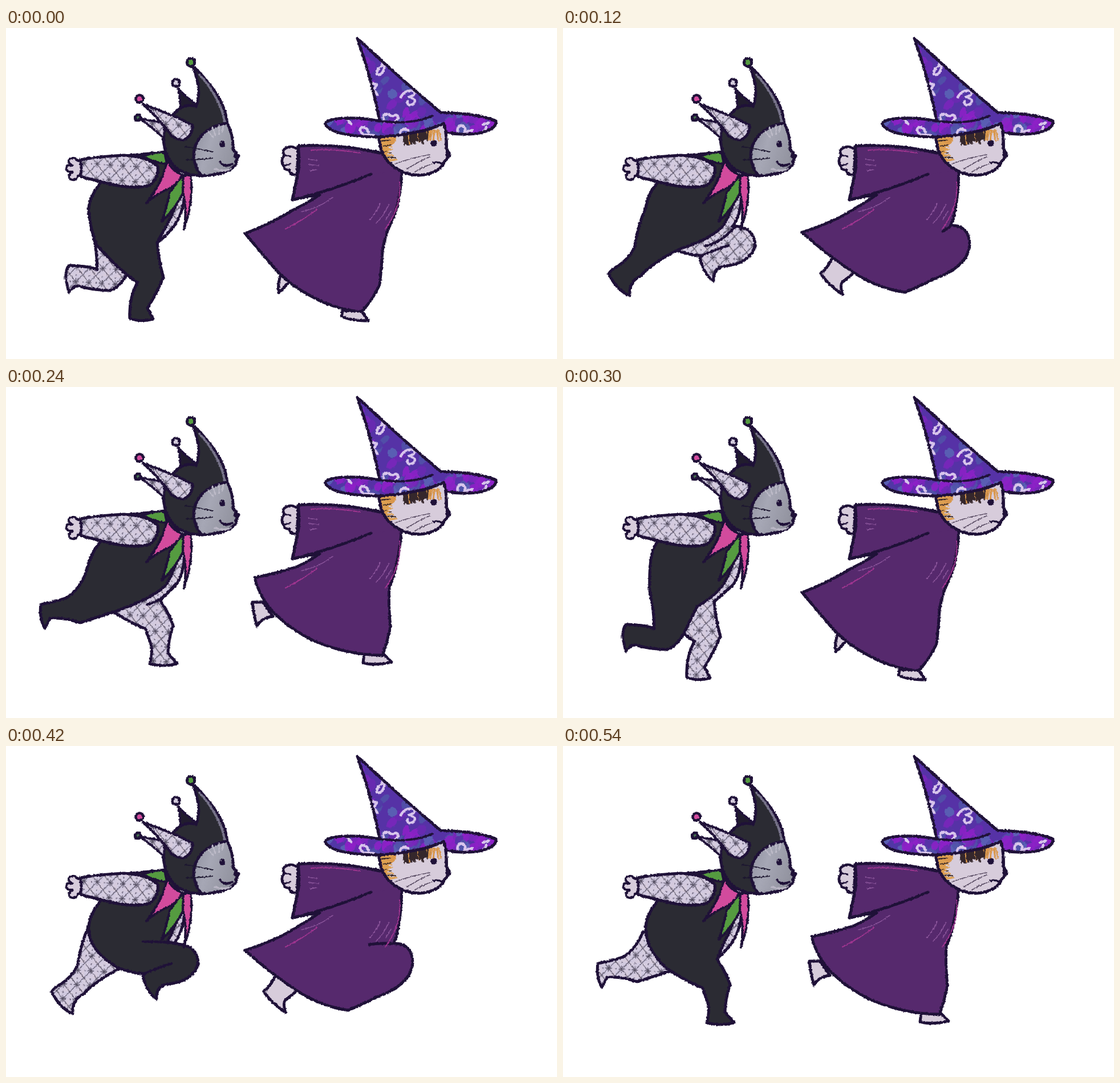
These frames come from a looping animation (966 px wide and 580 px high, 600 ms). An HTML page:

```html
<!DOCTYPE html>
<html lang="en">
<head>
<meta charset="utf-8">
<title>Two running cats in costume</title>
<style>
html, body { margin: 0; width: 100%; height: 100%; overflow: hidden; background: #fff; }
svg { display: block; width: 966px; height: 580px; }
</style>
</head>
<body>
<svg id="stage" viewBox="0 0 966 580" width="966" height="580"></svg>
<script>
const INK = '#1f1138', COAL = '#2b2b33', LACE = 'url(#lace)', GOWN = '#56296d', FUR = '#d7ccdb';
const PINK = '#d24b9d', GREEN = '#559b40';
const STEP = 60, COUNT = 10;

// Small repeatable random generator
let seed = 11;
const rnd = (a, b) => {
  seed = (seed * 16807) % 2147483647;
  return a + (b - a) * seed / 2147483647;
};

const shape = (d, fill, w = 5, extra = '') =>
  `<path d="${d}" fill="${fill}" stroke="${INK}" stroke-width="${w}" ${extra}/>`;
const line = (d, color = INK, w = 4, extra = '') =>
  `<path d="${d}" fill="none" stroke="${color}" stroke-width="${w}" ${extra}/>`;
const dot = (x, y, rx, fill, ry = rx) =>
  `<ellipse cx="${x}" cy="${y}" rx="${rx}" ry="${ry}" fill="${fill}"/>`;
const bell = (x, y, r, fill) =>
  `<circle cx="${x}" cy="${y}" r="${r}" fill="${fill}" stroke="${INK}" stroke-width="4.5"/>`;

// Jester legs: f = leg in front, b = leg behind (starting at s)
// Wizard: gown hem (hem) and feet
const poses = [
  { f: 'L265 376Q268 410 276 437Q264 465 248 491L258 510Q238 516 217 509Q215 475 230 446Q195 421 159 380',
    s: '235 385',
    b: 'Q222 410 212 432Q198 455 183 460Q150 459 127 452Q118 452 110 463L105 440Q104 425 110 416Q138 416 160 423Q160 395 152 357',
    hem: 'Q692 300 680 330Q665 360 660 390Q658 425 655 450Q641 480 623 497Q590 495 555 480Q500 455 470 420Q440 385 419 360Q470 340 505 318',
    feet: 'M483 430Q476 445 478 464L500 442ZM590 496L588 505Q604 513 635 513L622 494Z' },
  { f: 'L285 352Q308 385 298 412Q275 438 235 436Q222 445 221 468Q203 455 200 428L205 396L180 385',
    s: '222 396',
    b: 'Q190 420 173 455Q163 475 168 499Q146 500 128 484Q142 460 147 435Q149 395 144 345',
    hem: 'Q692 300 680 335Q672 355 678 370Q694 395 678 425Q650 465 605 487Q560 480 520 455Q465 410 418 358Q470 338 505 318',
    feet: 'M515 448Q511 470 500 482Q515 498 540 499Q536 483 545 468Z' },
  { f: 'L302 347Q335 350 337 380Q330 412 285 417Q262 420 264 444Q246 430 240 403L243 399Q215 397 195 388',
    s: '208 386',
    b: 'Q165 405 135 435Q115 445 117 469Q95 460 80 431Q84 424 95 418Q115 405 125 385Q130 350 145 315',
    inkB: 'M302 347Q280 375 250 382M290 381Q268 388 243 399',
    inkF: 'M240 343Q270 342 302 347M290 381Q268 388 243 399',
    hem: 'Q692 320 680 346Q712 345 713 380Q710 418 650 440Q620 455 600 463Q560 458 520 435Q465 400 419 358Q480 338 512 316',
    feet: 'M472 402Q465 420 452 430Q460 445 490 467Q485 450 490 445L514 426Z',
    foldB: 'M681 346L666 356', foldF: 'M637 348Q660 344 685 347' },
  { f: 'L270 374Q290 400 333 435Q350 433 364 429Q355 455 338 468Q300 450 250 427L176 389',
    s: '172 387',
    b: 'Q130 385 97 383Q85 365 68 345L41 343Q55 325 78 314Q95 330 106 341Q122 335 140 328',
    inkB: 'M297 345Q287 362 262 378',
    hem: 'Q687 325 678 350Q680 395 709 437Q660 457 590 451Q520 442 480 410Q440 375 436 340Q438 325 452 313Q490 325 520 312',
    feet: 'M455 312L445 309Q425 325 409 345Q425 340 438 342ZM680 445L713 461Q725 445 735 425L708 434Z' },
  { f: 'L270 374Q285 395 293 418Q284 445 284 466L300 485Q275 491 252 485Q257 470 255 455L245 424Q205 407 180 388',
    s: '190 394',
    b: 'L130 413Q95 402 77 406L68 423Q58 405 61 381Q85 377 107 369Q130 353 140 325',
    inkB: 'M297 345Q277 373 248 381',
    hem: 'Q687 320 672 350Q670 380 674 420Q668 450 660 470Q600 470 540 445Q490 420 460 385Q442 360 436 334Q480 325 510 315',
    feet: 'M450 377L432 377Q434 400 440 419Q447 405 468 402ZM628 468L626 483Q645 489 676 482L660 466Z' }
];

const TORSO = 'M200 225L280 217L308 262Q302 310 283 343';
const STRIP = 'M305 262L313 290';

function bodyPaths(p, nearInFront) {
  return nearInFront
    ? { near: TORSO + p.f + 'Q150 360 146 330Q140 305 165 272Z',
        far: `${STRIP}Q312 340 268 374L255 340ZM${p.s}${p.b}L200 335Z` }
    : { near: `${TORSO}Q268 366 ${p.s}${p.b}Q150 288 165 272Z`,
        far: `${STRIP}Q312 330 297 348${p.f}L262 340Z` };
}

const CONE = 'M655 163Q642 92 616 18Q688 86 762 148';
const BRIM = 'M655 163C610 155 560 156 560 169Q572 190 655 191Q730 185 768 167L772 183Q800 189 830 184Q860 178 859 163Q830 150 762 148';
const FACE = 'M654 190Q656 222 672 236Q692 256 722 258Q752 257 765 241Q769 233 778 223L772 212Q773 195 769 165Z';

function defs() {
  return `<defs>
  <filter id="rough" filterUnits="userSpaceOnUse" x="0" y="0" width="966" height="580" color-interpolation-filters="sRGB">
    <feTurbulence type="fractalNoise" baseFrequency=".32" numOctaves="1" seed="4"/>
    <feColorMatrix values="1 0 0 0 0  0 1 0 0 0  0 0 1 0 0  0 0 0 0 1" result="noise"/>
    <feDisplacementMap in="SourceGraphic" in2="noise" scale="4" xChannelSelector="R" yChannelSelector="G"/>
  </filter>
  <linearGradient id="mask" x1="0" y1="0" x2="1" y2=".4">
    <stop offset="0" stop-color="#8f909f"/><stop offset=".45" stop-color="#a6a7b5"/><stop offset="1" stop-color="#92939f"/>
  </linearGradient>
  <linearGradient id="tint" x1="0" y1="0" x2="1" y2="1">
    <stop offset="0" stop-color="#d9d0df"/><stop offset=".5" stop-color="#cfc8e0"/><stop offset="1" stop-color="#dacddb"/>
  </linearGradient>
  <pattern id="lace" width="23" height="26" patternUnits="userSpaceOnUse" patternTransform="translate(3 6) rotate(4)">
    <rect width="23" height="26" fill="url(#tint)"/>
    <path d="M0 0L23 26M23 0L0 26M6 13H17M11.500 7V19" stroke="#565063" stroke-width="1.300" fill="none"/>
    <circle cx="11.500" cy="1.500" r="1.200" fill="#625a72"/><circle cx="1.500" cy="13" r="1.200" fill="#625a72"/>
  </pattern>
  <clipPath id="hatClip"><path d="${CONE}L740 170Z"/><path d="${BRIM}Q705 175 655 163Z"/></clipPath>
  <clipPath id="faceClip"><path d="${FACE}"/></clipPath>
  </defs>`;
}

function jesterTop() {
  const collar =
    shape('M238 226Q258 217 278 218L282 238L268 236Z', GREEN, 4) +
    shape('M309 259Q314 275 311 288Q296 318 273 339Q283 310 287 288Z', GREEN, 4) +
    shape('M311 258L324 258Q328 290 319 330L312 352Q318 320 310 286Z', PINK, 4) +
    shape('M283 233Q292 252 309 257Q300 276 280 284Q262 292 246 307Q266 280 274 260Z', PINK, 4);
  const arm =
    shape('M132 231L126 233Q118 224 111 230Q107 237 117 241Q106 238 105 246Q106 253 117 252Q107 257 113 265Q123 269 126 259L132 258Z', FUR, 4) +
    shape('M130 231Q165 225 207 223Q250 226 266 242Q269 261 252 276Q225 282 190 275Q158 268 130 260Q134 245 130 231Z', LACE);
  const hood =
    shape('M302 106Q316 122 336 136L305 148Q307 126 302 106Z', '#211c2e', 4) +
    shape('M276 195Q278 160 305 141Q319 132 333 138Q345 110 327 66Q352 89 372 120Q386 144 388 167L345 259Q312 258 296 243Q278 225 276 195Z', COAL) +
    line('M339 82Q360 104 372 130Q381 148 383 164', '#77738a', 4);
  const horns =
    shape('M235 159L278 166L277 193Q258 176 235 159Z', LACE, 4) +
    shape('M240 133L301 157L327 170Q328 188 312 196Q300 197 290 188Q272 163 240 133Z', LACE, 4.5);
  const face =
    shape('M388 167Q399 188 398 213L408 224Q403 231 403 239Q390 257 343 259C308 215 345 170 388 167Z', 'url(#mask)') +
    line('M362 174L367 188M373 171L374 186M354 181L363 191M381 171L379 182', '#bdbbc8', 2.5) +
    line('M366 247Q382 252 394 247', '#b9b5c4', 3) +
    line('M375 234Q382 246 397 238') +
    dot(379, 203, 5, INK, 6) + dot(404, 224, 5, INK, 5) + dot(377, 201, 1.2, '#8d8998');
  const whiskers = line('M314 208Q340 212 362 217M316 231Q340 231 362 228', '#1d1730', 2);
  return collar + arm + hood + horns + face + whiskers +
    bell(324, 60, 7, GREEN) + bell(298, 96, 6.5, '#d2cadb') + bell(234, 124, 6.5, PINK) + bell(231, 157, 5, '#477451');
}

function hatFill() {
  const tones = ['#7c26bc', '#5054a8', '#8f20c8', '#5138a6', '#6a2ab2', '#5a67b5'];
  let s = '<rect x="550" y="10" width="320" height="190" fill="#5632a6"/>';
  for (let i = 0; i < 170; i++) {
    const x = rnd(560, 860), y = i % 2 ? rnd(150, 192) : rnd(20, 165);
    const tone = tones[Math.floor(rnd(0, 6))];
    s += `<ellipse cx="${x}" cy="${y}" rx="${rnd(5, 9)}" ry="${rnd(8, 13)}" fill="${tone}" opacity=".85" transform="rotate(${rnd(0, 60)} ${x} ${y})"/>`;
  }
  s += line('M653 52Q663 56 659 66Q649 73 650 81Q658 85 663 71Q664 62 657 52M642 97L650 99L645 108L651 117' +
    'M692 121Q701 106 716 111Q719 117 707 121Q722 125 714 133Q703 139 704 128M663 164Q658 149 670 151L677 155Q686 149 688 158L680 166' +
    'M645 188L626 187Q617 178 624 174Q634 174 635 182M598 160L605 168M691 183Q696 173 705 179L708 190' +
    'M792 186Q789 171 800 171Q809 176 803 184L817 179M836 169L846 166M838 181L842 174', '#d8c5ec', 4.5);
  return `<g clip-path="url(#hatClip)">${s}</g>`;
}

function hair() {
  let s = dot(655, 204, 16, '#d9974c', 32) + dot(672, 192, 12, '#d9974c', 14);
  for (let i = 0; i < 20; i++) {
    const y = 188 + i * 2.4;
    s += line(`M${655 + i * .8} ${y}l${rnd(12, 23) - i * .4} ${rnd(-3, 4)}`, i % 4 ? '#dda052' : '#3b2c2b', 2.2);
  }
  s += dot(720, 187, 25, '#35272c', 11) + dot(705, 197, 9, '#35272c', 9);
  for (let i = 0; i < 27; i++) {
    const x = 697 + i * 2.4;
    s += line(`M${x} 179l${rnd(-5, 4)} ${rnd(18, 27) - i * .25}`, i > 18 || i % 7 === 3 ? '#d9974c' : '#35272c', 2.6);
  }
  return `<g clip-path="url(#faceClip)">${s}</g>`;
}

function wizardTop() {
  const hand = shape('M512 213Q502 206 494 209Q482 213 488 223Q480 233 487 242Q489 250 496 248Q499 259 510 257Z', FUR, 4.5) +
    line('M489 223L499 225M489 241L499 238', INK, 3);
  const sleeve = `<path d="M512 207Q580 202 655 219L690 250L640 256Q570 281 502 301Q516 255 512 207Z" fill="${GOWN}"/>` +
    line('M655 219Q580 202 512 207Q517 245 508 272L502 301Q575 284 640 256', INK, 5);
  const glow = line('M535 214Q575 211 620 219M690 270Q694 312 665 352M545 318Q520 337 490 352', '#a03590', 2) +
    line('M530 230L546 232M530 239L548 241M534 250L545 248M572 297Q552 314 518 322M656 308Q650 322 638 336M671 309Q662 330 649 342M675 321L666 336', '#8c569c', 1.6);
  const head = shape(FACE, FUR) + hair() + line(FACE.replace('Z', ''), INK, 5) +
    line('M743 222Q715 226 682 238M743 226Q723 234 703 247M747 238Q732 243 717 252', '#54475f', 1.6) +
    line('M750 236Q757 234 765 238', INK, 3.5) + dot(750, 202, 5.5, INK) + dot(775, 221, 5, INK, 6);
  const hat = hatFill() + line(CONE + BRIM, INK, 5) + line('M655 163Q712 170 747 154');
  return hand + sleeve + glow + head + hat;
}

const stage = document.getElementById('stage');
stage.innerHTML = defs() +
  `<g filter="url(#rough)" stroke-linejoin="round" stroke-linecap="round">
    ${shape('', LACE, 5, 'id="far"')}${shape('', COAL, 5, 'id="near"')}${line('', INK, 4.5, 'id="crease"')}
    ${shape('', FUR, 5, 'id="feet"')}${shape('', GOWN, 5, 'id="gown"')}${line('', INK, 5, 'id="fold"')}
  </g>
  <g filter="url(#rough)" stroke-linejoin="round" stroke-linecap="round">${jesterTop()}${wizardTop()}</g>`;

const part = {};
for (const id of ['far', 'near', 'crease', 'feet', 'gown', 'fold']) part[id] = document.getElementById(id);
const setPath = (id, d) => part[id].setAttribute('d', d || '');

function draw(i) {
  const p = poses[i % 5];
  const nearInFront = i === 0 || i > 5;   // the legs trade places every half loop
  const body = bodyPaths(p, nearInFront);
  setPath('far', body.far);
  setPath('near', body.near);
  setPath('crease', nearInFront ? p.inkF : p.inkB);
  setPath('feet', p.feet);
  setPath('gown', `M512 207Q580 203 655 218L694 247${p.hem}Q532 305 550 292L502 301Q514 260 512 207Z`);
  setPath('fold', nearInFront ? p.foldF : p.foldB);
}

let shown = -1;
const start = performance.now();
function tick(now) {
  const i = Math.floor(Math.max(0, now - start) / STEP) % COUNT;
  if (i !== shown) draw(shown = i);
  requestAnimationFrame(tick);
}
draw(0);
requestAnimationFrame(tick);
</script>
</body>
</html>
```
